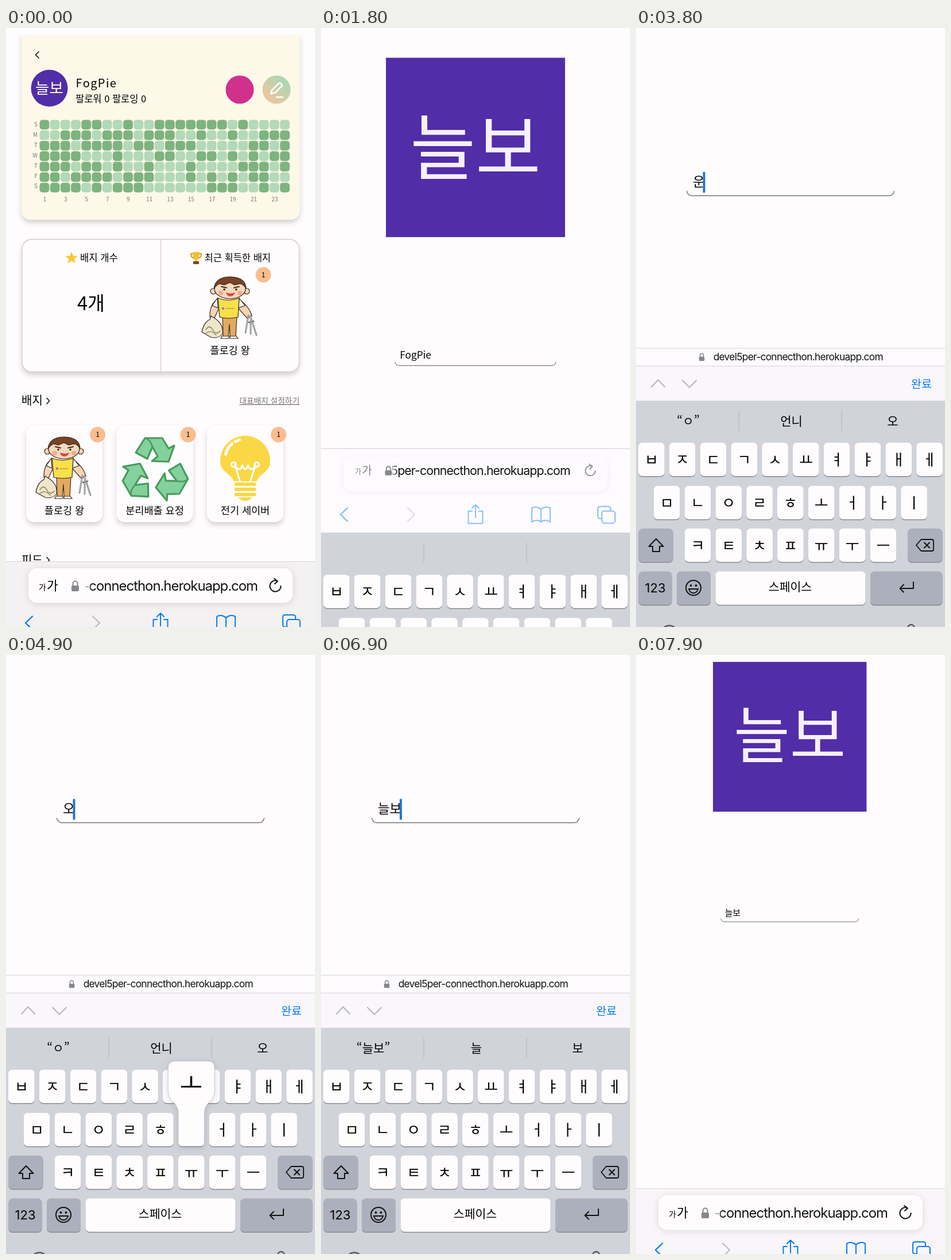
Animation of 538x1040 px, one loop 8000 ms. Source, as an HTML page:

```html
<!DOCTYPE html>
<html lang="ko">
<head>
<meta charset="utf-8">
<title>Profile edit</title>
<style>
  html, body { margin: 0; width: 100%; height: 100%; overflow: hidden; background: #fffcfe; }
  svg { display: block; width: 538px; height: 1040px; }
  text { font-family: 'Noto Sans CJK KR', 'Noto Sans', sans-serif; white-space: pre; }
  .ui { font-family: Inter, 'Noto Sans CJK KR', sans-serif; }
  .line { fill: none; stroke-linecap: round; stroke-linejoin: round; }
</style>
</head>
<body>
<svg id="stage" viewBox="0 0 538 1040"></svg>
<script>
const LOOP = 8000, STEP = 100;
const OLD_NAME = 'FogPie', NEW_NAME = '늘보';
const BLUE = '#0a7cf0', PAPER = '#fffcfe', PURPLE = '#512da8';
const KEY_W = 45.7, KEY_H = 58, PITCH = 53.8;

// ---------- markup helpers ----------
const text = (x, y, str, size, attrs = '') =>
  `<text x="${x}" y="${y}" font-size="${size}" ${attrs}>${str}</text>`;
const mid = (x, y, str, size, attrs = '') => text(x, y, str, size, 'text-anchor="middle" ' + attrs);
const rect = (x, y, w, h, r, fill, attrs = '') =>
  `<rect x="${x}" y="${y}" width="${w}" height="${h}" rx="${r}" fill="${fill}" ${attrs}/>`;
const circle = (x, y, r, fill, attrs = '') => `<circle cx="${x}" cy="${y}" r="${r}" fill="${fill}" ${attrs}/>`;
const line = (d, color, width = 2, attrs = '') =>
  `<path class="line" d="${d}" stroke="${color}" stroke-width="${width}" ${attrs}/>`;
const shape = (d, fill, attrs = '') => `<path d="${d}" fill="${fill}" ${attrs}/>`;
const at = (x, y, body, extra = '') => `<g transform="translate(${x} ${y}) ${extra}">${body}</g>`;
const range = n => [...Array(n).keys()];

// ---------- profile page ----------
const activity = [
  'x...xx..x..xxxxxxx.x....',
  '..xxx.xxx.xxx..x..x..xxx',
  'xxx.xxxx.xx.xxx.....xx.x',
  'xxxx...x...xx..xx.x.x.xx',
  'xxx.xx.x..x...x....xxx.x',
  'xx.xxxx.xxx...x.x.x.xx..',
  'xxxx.x.xxx......xxx..x.x'
];

function heatmap() {
  const cells = activity.flatMap((row, j) => [...row].map((c, i) =>
    rect(58.5 + i * 18.2, 159.5 + j * 18.2, 16.8, 16.8, 5, c === 'x' ? '#7db37f' : '#b2d9b8')));
  const days = [...'SMTWTFS'].map((d, j) =>
    text(55, 171 + j * 17.9, d, 10, 'text-anchor="end" fill="#777"'));
  const weeks = range(12).map(i => mid(67.5 + i * 36.4, 301, 2 * i + 1, 10, 'fill="#777"'));
  return [...cells, ...days, ...weeks].join('');
}

const INK = 'stroke="#3a2a22" stroke-width="1.2"';
const boy = () =>
  shape('M29 38Q14 48 15 70L23 71L33 50Z', '#f7d3b5', INK) +
  shape('M65 38Q84 52 88 68L80 72L62 52Z', '#f7d3b5', INK) +
  shape('M37 69H62L60 104H50L49 82L47 104H38Z', '#e3aa62', INK) +
  shape('M36 103h12v4h-14zM50 103h11l3 4h-14z', '#fff', INK) +
  shape('M28 37L19 50L29 54ZM66 37L76 50L65 54Z', '#fff', INK) +
  shape('M29 37Q47 44 66 37L64 70Q48 74 32 70Z', '#f8e048', INK) +
  circle(38, 55, 2.2, '#8a7fc4') + line('M43 55H57', '#b3a245', 1.5) +
  circle(21, 25, 5, '#f7d3b5', INK) + circle(79, 25, 5, '#f7d3b5', INK) +
  `<ellipse cx="50" cy="21" rx="27" ry="17" fill="#f9d9bd" ${INK}/>` +
  shape('M22 21Q24 0 51 0Q78 1 78 21Q74 13 68 12L58 14L50 10L40 14L32 12Q26 14 22 21Z', '#7a4323', INK) +
  line('M35 17L44 19M57 19L66 17', '#3a2a22', 1.8) +
  circle(40, 22, 1.8, '#222') + circle(61, 22, 1.8, '#222') +
  circle(34, 28, 4, '#f5a98e') + circle(67, 28, 4, '#f5a98e') +
  shape('M43 27Q51 31 59 27Q57 34 50 34Q44 33 43 27Z', '#d6473c') +
  shape('M17 68L25 73Q39 83 37 99Q30 108 17 105L1 96Q4 79 15 74Z', '#eee6cb', INK) +
  line('M8 92Q14 82 20 92T33 94M8 98Q17 91 26 101', '#857a5d', 1.4) +
  line('M82 67L77 97M86 68L86 99M86 70L96 101M83 79L91 77', '#666', 2.6) +
  line('M82 67L77 97M86 68L86 99M86 70L96 101', '#ddd', 1);

const recycle = () => [0, 120, 240].map(a =>
  shape('M-33-32L-17-57H13L24-39L34-44L24-16L-5-17L5-25L-4-42L-13-21Z', '#85d19d',
    `stroke="#469c5b" stroke-width="3.2" stroke-linejoin="round" transform="rotate(${a})"`) +
  line('M-17-57Q-8-55-4-42', '#469c5b', 2.6, `transform="rotate(${a})"`)).join('');

const bulb = () =>
  shape('M-43 7A43.5 43.5 0 1 1 43 7C40 20 24 24 20 36H-20C-24 24-40 20-43 7Z', '#fbd745') +
  [38, 47, 56].map(y => rect(-19, y, 38, 6, 3, '#fbd745')).join('') +
  shape('M-12 64H12Q8 70 0 70T-12 64Z', '#fbd745') +
  line('M-9 36L-18 8Q-9 22-5 8Q0 22 5 8Q9 22 18 8L9 36', '#fff', 3) +
  circle(-20, 7, 4, 'none', 'stroke="#fff" stroke-width="3"') +
  circle(20, 7, 4, 'none', 'stroke="#fff" stroke-width="3"') +
  line('M-34-11Q-31-23-23-29M-17-33L-10-36', '#fff', 5);

const starPath = 'M' + range(10).map(i => {
  const r = i % 2 ? 4.8 : 11, a = i * Math.PI / 5;
  return `${(r * Math.sin(a)).toFixed(1)} ${(-r * Math.cos(a)).toFixed(1)}`;
}).join('L') + 'Z';

const trophy = () =>
  line('M-5-7H-9Q-9 0-3 1M5-7H9Q9 0 3 1', '#d99a1c', 2) +
  shape('M-6-10H6Q6 2 1.5 4V7H-1.5V4Q-6 2-6-10Z', '#f4bd32') + rect(-5, 6, 10, 5, 1, '#7a4a21');

const counter = (x, y) => circle(x, y, 13.5, '#fbbd8e') + mid(x, y + 4.3, 1, 12);
const badge = (x, label, icon) =>
  rect(x, 690, 133, 168, 15, PAPER, 'filter="url(#shadow)"') + icon +
  mid(x + 66.5, 843.5, label, 17.5) + counter(x + 124.5, 706);

const profilePage = () =>
  rect(27, 2, 484.5, 331, 16, '#fef8e8', 'filter="url(#shadow)"') +
  line('M57 41L51.5 46.5L57 52', '#111', 1.7) +
  circle(75.5, 104.5, 32, PURPLE) + mid(75.5, 114, NEW_NAME, 26.5, 'fill="#fff"') +
  text(121.5, 103, OLD_NAME, 20, 'font-weight="500" letter-spacing="1.4"') +
  text(121, 129, '팔로워 0 팔로잉 0', 16.5) +
  circle(407, 107, 24.5, '#d0318c') +
  circle(471, 107, 24.5, 'url(#pencilTint)') +
  line('M461 114L463 108L475 96Q479 95 481 100L469 112L461 114ZM471 120H482', '#fff', 2.6) +
  heatmap() +
  rect(28, 367, 482.5, 230, 17, PAPER, 'stroke="#cfced2" stroke-width="1.4" filter="url(#shadow)"') +
  line('M269.5 367V597', '#cfced2', 1.3) +
  at(114, 399.5, shape(starPath, '#fbc531')) + text(129, 404.5, '배지 개수', 16.6) +
  mid(148, 489.5, '4개', 32.5, 'font-weight="500"') +
  at(331, 399, trophy()) + text(345.5, 404.5, '최근 획득한 배지', 16.5) +
  at(340, 432, boy()) + counter(448, 428.5) + mid(390, 565.5, '플로깅 왕', 17.5) +
  text(27, 653.5, '배지', 20, 'font-weight="500"') + line('M71 642.5L75.5 647.5L71 652.5', '#111', 1.6) +
  text(511, 652, '대표배지 설정하기', 13.7, 'text-anchor="end" fill="#77757a" text-decoration="underline"') +
  badge(35, '플로깅 왕', at(51, 710, boy())) +
  badge(192.5, '분리배출 요정', at(259, 769, recycle())) +
  badge(350, '전기 세이버', at(416.5, 751, bulb())) +
  text(27, 930.5, '피드', 20, 'font-weight="500"') + line('M71 919L75.5 924L71 929', '#111', 1.6);

// ---------- edit page; origin is the middle of the picture's lower edge ----------
const editPage = () =>
  rect(-133.7, -267, 267.4, 267, 0, PURPLE) +
  mid(0, -94, NEW_NAME, 106, 'fill="#f6f0fb" font-weight="500"') +
  line('M-120 186Q-119 191-114 191.2H114Q119 191 120 186', '#77757b', 1) +
  text(-113, 180.5, '', 14.8, 'id="field"') +
  rect(0, 163.7, 2.6, 24, 1, '#1a73e0', 'id="caret"');

// ---------- browser bar ----------
const lock = rect(-6.5, -1, 13, 10, 2, '#87868b') + line('M-4-1V-4.5A4 4 0 0 1 4-4.5V-1', '#87868b', 2);
const refresh = line('M3-9.2A9.6 9.6 0 1 0 9.6 0M-2-13L4-8.5L-1-4', '#111', 2);
const navIcons = [
  [40, line('M6-11.5L-6 0L6 11.5', BLUE, 2.4)],
  [157, line('M-6-11.5L6 0L-6 11.5', '#bfbec3', 2.4)],
  [269, line('M-6-6H-12.5V15.5H12.5V-6H6M0 5V-17M-6-11L0-17L6-11', BLUE)],
  [383, line('M0-9C-5-14-13-14-16-11V13C-11 9-4 9 0 13C4 9 11 9 16 13V-11C13-14 5-14 0-9V13', BLUE)],
  [497, line('M-8 7H-11Q-15 7-15 3V-10Q-15-14-11-14H3Q7-14 7-10V-7', BLUE) +
        rect(-8, -6, 23, 21, 4, 'none', `stroke="${BLUE}" stroke-width="2"`)]
];

const browserBar = () =>
  rect(0, 0, 538, 0, 0, '#f8f6f9', 'id="barBack"') + line('M0 0H538', '#d6d4d8', 1.2, 'id="barLine"') +
  `<g id="pill">${rect(39, 0, 460, 60, 15, PAPER, 'filter="url(#soft)"')}</g>` +
  `<g id="nav">${navIcons.map(([x, icon]) => at(x, 0, icon)).join('')}</g>` +
  `<g id="fontButton">${text(-17, 7, '가', 14)}${text(-3, 7, '가', 21.5)}</g>` +
  `<g id="lock">${lock}</g><g id="refresh">${refresh}</g>` +
  text(0, 0, 'devel5per-connecthon.herokuapp.com', 20,
    'id="url" class="ui" text-anchor="end" fill="url(#urlFade)" letter-spacing="-.042em"');

const accessory = () =>
  rect(0, 587, 538, 60, 0, '#f9f7fb') + line('M0 587H538', '#d6d4d8', 1.2) +
  line('M27 623L38.5 611L50 623M81 612L93 624L105 612', '#b9b8be', 2.2) +
  text(515, 624.5, '완료', 19.5, `text-anchor="end" font-weight="500" fill="${BLUE}"`);

// ---------- keyboard ----------
const keyRows = [['ㅂㅈㄷㄱㅅㅛㅕㅑㅐㅔ', 4, 720], ['ㅁㄴㅇㄹㅎㅗㅓㅏㅣ', 30.8, 795], ['ㅋㅌㅊㅍㅠㅜㅡ', 84.7, 869]];
const keyAt = {};
for (const [chars, x, y] of keyRows)
  [...chars].forEach((c, i) => keyAt[c] = [x + i * PITCH + KEY_W / 2, y]);

const key = (x, y, w, fill = PAPER, attrs = '') =>
  rect(x, y + 1.5, w, KEY_H, 7, '#898b91') + rect(x, y, w, KEY_H, 7, fill, attrs);
const GREY = '#abb0bc';

const keyboard = () =>
  rect(0, 647, 538, 520, 0, '#d1d3da') +
  line('M179 665V699M358 665V699', '#b7b9c0', 1.3) +
  range(3).map(i => mid([91, 270.5, 447][i], 689.5, '', 21, `id="hint${i}"`)).join('') +
  `<g id="swirl">${at(449, 684,
    shape('M-1-13Q6-9 4-6Q9-4 7 0Q13 2 10 6Q15 12 7 13H-8Q-15 11-10 6Q-13 2-7 0Q-9-5-4-6Q1-8-1-13Z', '#7b4a30') +
    circle(-4, 1, 3, '#fff') + circle(4, 1, 3, '#fff') + circle(-4, 1, 1.4, '#222') + circle(4, 1, 1.4, '#222') +
    shape('M-6 6H6Q3 11 0 11T-6 6Z', '#fff'))}</g>` +
  Object.entries(keyAt).map(([c, [x, y]]) => key(x - KEY_W / 2, y, KEY_W) + mid(x, y + 38.5, c, 26)).join('') +
  key(4.5, 869, 60, GREY) + key(473, 869, 60.5, GREY, 'id="eraseKey"') +
  line('M35 887L22.5 900H29V909H41V900H47.5Z', '#111') +
  `<path id="eraseIcon" class="line" d="M488 898L496.5 888H515Q518 888 518 891V905Q518 908 515 908H496.5Z" stroke="#111" stroke-width="1.8"/>` +
  line('M502 893.5L511 902.5M511 893.5L502 902.5', '#111', 2, 'id="eraseCross"') +
  key(4.5, 943.5, 58, GREY) + mid(33.5, 980, '123', 22, 'class="ui"') +
  key(71, 943.5, 59, GREY) + circle(100, 972, 13, 'none', 'stroke="#111" stroke-width="2"') +
  circle(95.5, 968, 1.9, '#111') + circle(104.5, 968, 1.9, '#111') +
  shape('M92 974H108Q106 981 100 981T92 974Z', 'none', 'stroke="#111" stroke-width="1.8"') +
  key(138.5, 943.5, 261) + mid(268.5, 977.5, '스페이스', 20.5) +
  key(408, 943.5, 125.5, GREY) + line('M483 962V973H460M466 966.5L459.5 973L466 979.5', '#111') +
  circle(58, 1052, 14.5, 'none', 'stroke="#55575c" stroke-width="2.4"') +
  rect(473, 1036, 12, 26, 6, 'none', 'stroke="#55575c" stroke-width="2.4"') +
  '<g id="popups"></g>';

function popup(c) {
  const [x, y] = keyAt[c], half = KEY_W / 2;
  const cx = Math.min(Math.max(x, 43.5), 494.5), l = cx - 40.5, r = cx + 40.5;
  const d = `M${l + 12} ${y - 90}H${r - 12}Q${r} ${y - 90} ${r} ${y - 78}V${y - 38}` +
    `C${r} ${y - 18} ${x + half} ${y - 20} ${x + half} ${y}V${y + 51}Q${x + half} ${y + 58} ${x + half - 7} ${y + 58}` +
    `H${x - half + 7}Q${x - half} ${y + 58} ${x - half} ${y + 51}V${y}` +
    `C${x - half} ${y - 20} ${l} ${y - 18} ${l} ${y - 38}V${y - 78}Q${l} ${y - 90} ${l + 12} ${y - 90}Z`;
  return shape(d, PAPER, 'filter="url(#soft)" stroke="#a9abb2" stroke-width=".7"') + mid(cx, y - 36, c, 43);
}

// ---------- stage ----------
const stage = document.getElementById('stage');
stage.innerHTML = `<defs>
  <filter id="shadow" x="-10%" y="-10%" width="120%" height="125%"><feDropShadow dx="0" dy="5" stdDeviation="4" flood-color="#444" flood-opacity=".24"/></filter>
  <filter id="soft" x="-20%" y="-40%" width="140%" height="190%"><feDropShadow dx="0" dy="2" stdDeviation="6" flood-color="#333" flood-opacity=".13"/></filter>
  <linearGradient id="pencilTint" x1="0" y1="1" x2="1" y2="0"><stop offset=".1" stop-color="#f3c49c"/><stop offset=".9" stop-color="#a2d9b6"/></linearGradient>
  <linearGradient id="urlFade" gradientUnits="userSpaceOnUse" y1="0" y2="0"><stop stop-color="#111" stop-opacity="0"/><stop offset="1" stop-color="#111"/></linearGradient>
  <clipPath id="page">${rect(0, 12, 538, 1028, 0, '#000')}</clipPath>
</defs>${rect(0, 0, 538, 1040, 0, PAPER)}
<g clip-path="url(#page)"><g id="profile">${profilePage()}</g><g id="edit">${editPage()}</g></g>
<g>${browserBar()}</g><g id="accessory">${accessory()}</g><g id="keyboard">${keyboard()}</g>`;
const el = {};
for (const node of stage.querySelectorAll('[id]')) el[node.id] = node;

// ---------- timeline ----------
const OPEN_EDIT = 500, FOCUS = 1700, DONE = 7150;
const typed = [
  [0, OLD_NAME], [2300, 'FogPi'], [2600, 'FogP'], [2700, 'Fog'], [2800, 'Fo'], [2900, 'F'], [3000, ''],
  [3200, 'ㅇ'], [3400, '우'], [3600, '운'], [4100, '우'], [4300, 'ㅇ'], [4500, ''],
  [4700, 'ㅇ'], [4900, '오'], [5100, '옵'], [5300, '오'], [5500, ''],
  [5800, 'ㄴ'], [5900, '느'], [6200, '늘'], [6500, '늘ㅂ'], [6700, NEW_NAME]
];
const hints = [
  [0, '', '', ''], [3500, '“ㅇ”', '언니', '오'], [4000, '“운”', '운동', '운'], [4600, '', '', ''],
  [4900, '“ㅇ”', '언니', '오'], [5600, '', '', ''],
  [5900, '“느”', '언<tspan fill-opacity=".3">니</tspan>', 'swirl'], [6100, '“느”', '느낌', '는'],
  [6400, '“늘”', '늘', '늘어'], [6900, '“늘보”', '늘', '보']
];
const presses = [
  ['erase', 2200, 3000], ['ㅇ', 3200, 3400], ['ㅜ', 3400, 3600], ['ㄴ', 3600, 3800],
  ['erase', 4100, 4200], ['erase', 4300, 4400], ['erase', 4500, 4600],
  ['ㅇ', 4700, 4900], ['ㅗ', 4900, 5100], ['ㅂ', 5100, 5300], ['erase', 5300, 5400], ['erase', 5500, 5600],
  ['ㄴ', 5800, 6100], ['ㅡ', 5900, 6100], ['ㄹ', 6200, 6400], ['ㅂ', 6500, 6700], ['ㅗ', 6700, 6900]
];

const lerp = (a, b, k) => a + (b - a) * k;
const progress = (t, start, length) => Math.min(1, Math.max(0, (t - start) / length));
const easeOut = k => 1 - (1 - k) ** 3;
const smooth = k => k * k * (3 - 2 * k);
const current = (list, t) => list.findLast(item => item[0] <= t);
const show = (node, on) => node.setAttribute('display', on ? 'inline' : 'none');
const set = (node, attrs) => { for (const k in attrs) node.setAttribute(k, attrs[k]); };
const place = (node, x, y, scale = 1) => set(node, { transform: `translate(${x} ${y}) scale(${scale})` });

function drawPage(t) {
  show(el.profile, t < OPEN_EDIT);
  show(el.edit, t >= OPEN_EDIT);
  const back = smooth(progress(t, 7500, 400));
  const zoom = smooth(progress(t, FOCUS, 260));
  const scroll = smooth(progress(t, 1800, 300));
  const scale = lerp(lerp(1, 1.504, zoom), 1, back);
  const bottom = lerp(40 + 277 * lerp(1, 1.504, zoom) - 453 * scroll, 272, back);
  place(el.edit, lerp(269, 267.7, back), bottom, scale);

  el.field.textContent = current(typed, t)[1];
  show(el.caret, t >= 2000 && t < 7200);
  const end = el.field.textContent ? el.field.getComputedTextLength() - 2 : 0;
  set(el.caret, { x: -113 + end });
}

function drawBar(t, p) {
  const top = lerp(926.5, 556, p), urlY = top + lerp(42.5, 15.5, p ** 3), size = lerp(1, 0.728, p ** 1.45);
  const fade = 1 - p;
  set(el.barBack, { y: top, height: 1040 - top, fill: t < OPEN_EDIT ? '#f3f1f1' : p > .3 ? '#fdfbfd' : '#f8f6f9' });
  place(el.barLine, 0, top);
  place(el.pill, 0, top + 11.5 + 4 * p);
  place(el.nav, 0, top + 106.5 + 15 * p);
  place(el.fontButton, 74, urlY, size);
  place(el.refresh, 469, urlY, size);
  place(el.lock, lerp(120.5, 114.5, p), urlY, size);
  for (const id of ['pill', 'nav', 'fontButton', 'refresh']) set(el[id], { opacity: fade });
  set(el.url, { x: lerp(438, 430, p), y: urlY + 8.2 * size, 'font-size': 23.9 * size });
  const edge = lerp(136, 106, p);
  set(el.urlFade, { x1: edge, x2: edge + 14 });
}

function drawKeyboard(t, p) {
  const shift = lerp(487, 0, p);
  place(el.keyboard, 0, shift);
  place(el.accessory, 0, shift);
  set(el.accessory, { opacity: Math.max(0, (p - 0.6) / 0.4) });

  const [, ...words] = current(hints, t);
  const swirl = words[2] === 'swirl';
  words.forEach((word, i) => el['hint' + i].innerHTML = swirl && i === 2 ? '' : word);
  show(el.swirl, swirl);

  const down = presses.filter(([, from, to]) => t >= from && t < to).map(([name]) => name);
  const erasing = down.includes('erase');
  set(el.eraseKey, { fill: erasing ? PAPER : GREY });
  set(el.eraseIcon, { style: `fill:${erasing ? '#111' : 'none'}` });
  set(el.eraseCross, { stroke: erasing ? '#fff' : '#111' });
  el.popups.innerHTML = down.filter(name => keyAt[name]).map(popup).join('');
}

function render(now) {
  const t = Math.floor(now % LOOP / STEP) * STEP;
  const raised = t < DONE ? easeOut(progress(t, FOCUS, 450)) : 1 - easeOut(progress(t, DONE, 420));
  drawPage(t);
  drawBar(t, raised);
  drawKeyboard(t, raised);
  requestAnimationFrame(render);
}
render(0);
</script>
</body>
</html>
```
